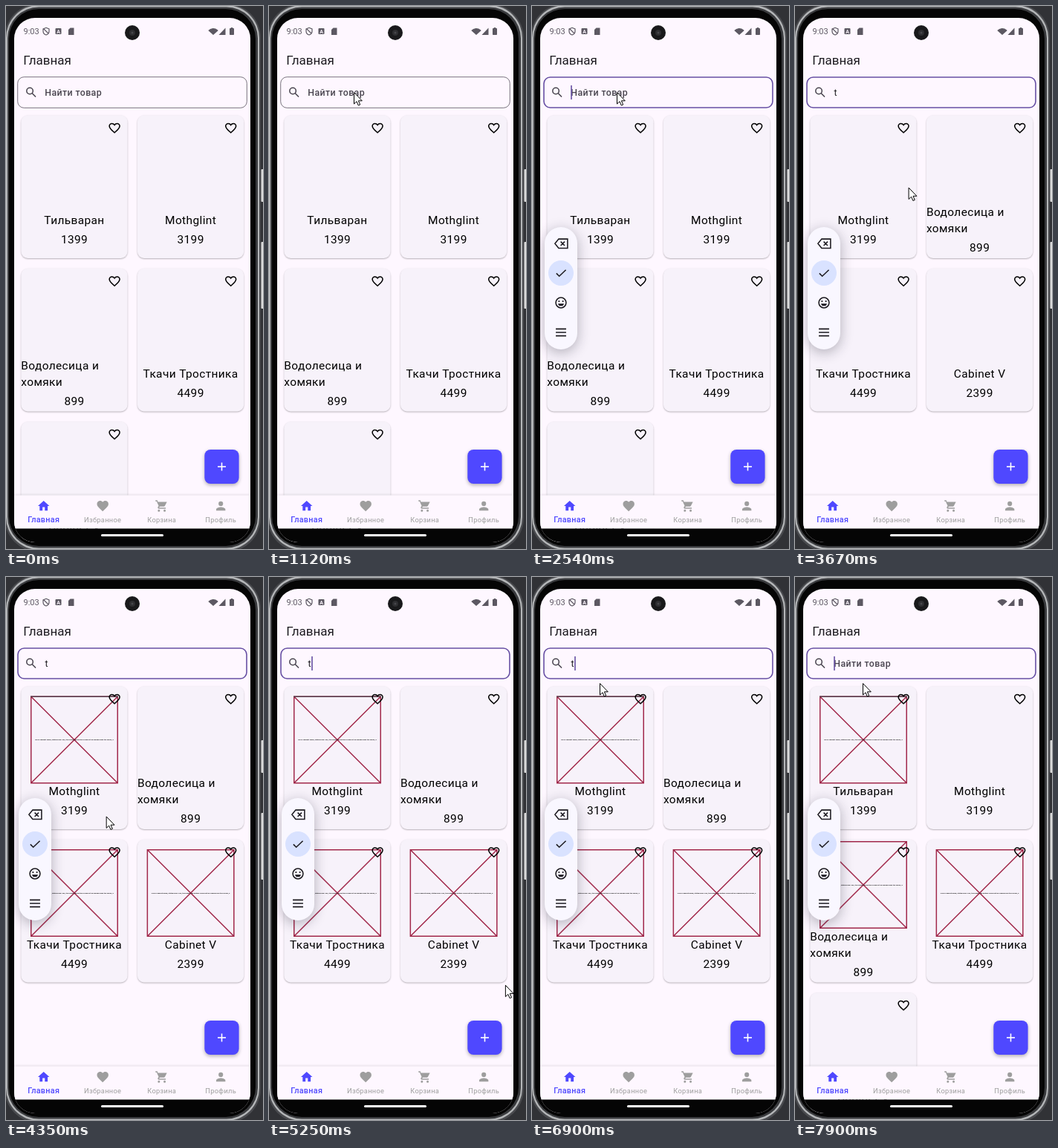
These frames come from a looping animation (346 px wide and 732 px high, 8000 ms). An HTML page with a canvas:

```html
<!DOCTYPE html>
<html lang="ru">
<head>
<meta charset="utf-8">
<title>Главная</title>
<style>
html, body { margin: 0; width: 100%; height: 100%; overflow: hidden; background: #313236; }
canvas { display: block; width: 346px; height: 732px; }
</style>
</head>
<body>
<canvas id="stage"></canvas>
<script>
const W = 346, H = 732, LOOP = 8000, DP = 0.772;
const INK = '#1d1b20', MUTED = '#49454f', PURPLE = '#6750a4', BLUE = '#4f48ff';
const GREY = '#9e9e9e', SURFACE = '#fef7ff', CARD = '#f7f2fa', RED = '#a1284a';

const canvas = document.getElementById('stage');
const ctx = canvas.getContext('2d');
const dpr = window.devicePixelRatio || 1;
canvas.width = W * dpr;
canvas.height = H * dpr;

const goods = [
  { name: ['Тильваран'], price: '1399' },
  { name: ['Mothglint'], price: '3199' },
  { name: ['Водолесица и', 'хомяки'], price: '899' },
  { name: ['Ткачи Тростника'], price: '4499' },
  { name: ['Cabinet V'], price: '2399' }
];
const BROKEN = [0, 2, 3];
const ERROR = 'HTTP request failed, statusCode: 403, the requested picture could not be loaded from the server, 0';

// Moments of the story, in ms
const T = { enter: 220, focus: 1260, bubble: 1920, slide: 2000, type: 2870, broken: 4280, clear: 7830 };
const BLINKS = [1470, 1960, 2540, 3340, 3850, 4350, 4860, 5370, 5870, 6380, 6900, 7430, 7830];

// Pointer: time, x, y
const TRACK = [
  [220, 296, 644], [480, 226, 440], [740, 156, 240], [980, 122, 145], [1120, 114, 116],
  [3340, 114, 116], [3560, 112, 210], [3860, 240, 284], [4060, 299, 262], [4210, 225, 300],
  [4350, 135, 322], [4600, 92, 470], [4850, 140, 568], [4980, 200, 560], [5200, 318, 540],
  [5450, 270, 605], [5800, 300, 560], [5950, 303, 525], [6080, 256, 497], [6350, 170, 330],
  [6620, 91, 145], [6700, 91, 143]
];

const HEART = new Path2D('M12 20C7 15.4 3 12.3 3 8.5C3 6 5 4 7.5 4C9.3 4 11 5 12 6.6C13 5 14.7 4 16.5 4C19 4 21 6 21 8.5C21 12.3 17 15.4 12 20z');
const HEART_FULL = new Path2D('M12 21.35C5.4 15.4 2 12.3 2 8.5C2 5.4 4.4 3 7.5 3C9.2 3 10.9 3.8 12 5.1C13.1 3.8 14.8 3 16.5 3C19.6 3 22 5.4 22 8.5C22 12.3 18.6 15.4 12 21.35z');
const HOME = new Path2D('M10 20v-6h4v6h5v-8h3L12 3 2 12h3v8z');
const CART = new Path2D('M1 2v2h2l3.6 7.6-1.35 2.45C4.5 15.4 5.5 17 7 17h12v-2H7.4l1-2h7.2c.75 0 1.4-.4 1.75-1L21 5H5.2L4.3 2zM5 20a2 2 0 1 0 4 0a2 2 0 1 0-4 0zM15 20a2 2 0 1 0 4 0a2 2 0 1 0-4 0z');
const PERSON = new Path2D('M8 8a4 4 0 1 0 8 0a4 4 0 1 0-8 0zM12 14c-2.7 0-8 1.3-8 4v2h16v-2c0-2.7-5.3-4-8-4z');
const SEARCH = new Path2D('M15 9.5a5.5 5.5 0 1 0-11 0a5.5 5.5 0 1 0 11 0zM13.7 13.7L19.8 19.8');
const ERASE = new Path2D('M8 4H23.5V20H8L1.5 12zM11.5 8.5l7 7M18.5 8.5l-7 7');
const CHECK = new Path2D('M4 12.5l5 5L20.5 6.5');
const SMILE = new Path2D('M3 12a9 9 0 1 0 18 0a9 9 0 1 0-18 0z');
const FACE = new Path2D('M7.2 9.5a1.4 1.4 0 1 0 2.8 0a1.4 1.4 0 1 0-2.8 0zM14 9.5a1.4 1.4 0 1 0 2.8 0a1.4 1.4 0 1 0-2.8 0zM7 13.5h10a5 4 0 0 1-10 0z');
const MENU = new Path2D('M3 6h18M3 12h18M3 18h18');
const ARROW = new Path2D('M.5 .5V16L4 12.7L6.3 18L8.7 17L6.4 11.8H11.3z');

const clamp = v => Math.min(1, Math.max(0, v));
const ease = v => 1 - Math.pow(1 - clamp(v), 3);

function box(x, y, w, h, r, fill) {
  ctx.beginPath();
  ctx.roundRect(x, y, w, h, r);
  if (fill) { ctx.fillStyle = fill; ctx.fill(); }
}

function disc(x, y, r, fill) {
  ctx.beginPath();
  ctx.arc(x, y, r, 0, Math.PI * 2);
  ctx.fillStyle = fill;
  ctx.fill();
}

function shadow(color, blur, dy) {
  ctx.shadowColor = color;
  ctx.shadowBlur = blur * dpr;
  ctx.shadowOffsetY = dy * dpr;
}

function noShadow() { shadow('transparent', 0, 0); }

function text(str, x, y, size, color, opt = {}) {
  ctx.font = `${opt.weight || 400} ${size}px Roboto, sans-serif`;
  ctx.letterSpacing = (opt.gap || 0) + 'px';
  ctx.textAlign = opt.align || 'left';
  ctx.fillStyle = color;
  ctx.fillText(str, x, y);
}

// Icons live on a 24-unit grid centred on x, y
function icon(path, x, y, color, line) {
  ctx.save();
  ctx.translate(x, y);
  ctx.scale(DP, DP);
  ctx.translate(-12, -12);
  if (line) {
    ctx.lineWidth = line;
    ctx.strokeStyle = color;
    ctx.stroke(path);
  } else {
    ctx.fillStyle = color;
    ctx.fill(path);
  }
  ctx.restore();
}

function poly(points, fill) {
  ctx.beginPath();
  points.forEach(([x, y]) => ctx.lineTo(x, y));
  ctx.closePath();
  ctx.fillStyle = fill;
  ctx.fill();
}

function drawPhone() {
  ctx.fillStyle = '#313236';
  ctx.fillRect(0, 0, W, H);
  box(343.5, 220, 4, 44, 1, '#dcdcdc');
  box(343.5, 318, 4, 90, 1, '#dcdcdc');
  box(-2, -3, 345, 739, 46, '#4a4b4f');
  box(0, -1, 341, 734, 44, '#b4b6b8');
  box(2, 1.5, 337, 729, 42, '#3a3b3e');
  box(4, 4, 332, 724, 40, '#050505');
}

function drawStatus() {
  const c = '#5c5862';
  text('9:03', 23.5, 38, 11, c);
  ctx.strokeStyle = c;
  ctx.lineWidth = 1.2;
  ctx.stroke(new Path2D('M54 29.3L58 31V34C58 36.5 56.3 38.3 54 39C51.700 38.3 50 36.500 50 34V31zM51 31L57 37'));
  box(66.500, 30, 8, 8, 1, c);
  text('A', 70.5, 36.6, 7, SURFACE, { align: 'center', weight: 700 });
  poly([[86.5, 29.5], [91.5, 29.5], [91.5, 39], [84, 39], [84, 32]], c);
  ctx.beginPath();
  ctx.moveTo(279, 39);
  ctx.arc(279, 39, 9, -Math.PI * 0.77, -Math.PI * 0.23);
  ctx.closePath();
  ctx.fillStyle = c;
  ctx.fill();
  poly([[286.5, 39], [295.5, 39], [295.5, 29.5]], c);
  box(301, 30, 6, 9, 0.8, c);
  box(302.7, 29, 2.6, 2, 0, c);
  disc(170, 36, 10, '#19191b');
  disc(170, 36, 4, '#2e2e31');
  disc(170, 36, 1.5, '#48484c');
}

function caretOn(t) {
  return BLINKS.filter(b => b <= t).length % 2 === 1;
}

function drawSearch(t) {
  const f = clamp((t - T.focus) / 170);
  const typed = t >= T.type && t < T.clear;
  const line = 1 + 0.6 * f;
  box(15.2 + line / 2, 95.2 + line / 2, 309.6 - line, 42.6 - line, 8.5);
  ctx.lineWidth = line;
  ctx.strokeStyle = f >= 1 ? PURPLE : `color-mix(in srgb, ${PURPLE} ${f * 100}%, #79747e)`;
  ctx.stroke();
  icon(SEARCH, 34, 116.5, MUTED, 2);
  if (typed) text('t', 52.5, 121, 12.35, INK, { gap: 0.386 });
  else text('Найти товар', 52.3, 120.8, 12.35, MUTED, { gap: 0.386, weight: 500 });
  if (caretOn(t)) {
    ctx.fillStyle = PURPLE;
    ctx.fillRect(typed ? 57.2 : 52.2, 107, 1.6, 19);
  }
}

function drawBroken(cx, y, top) {
  const s = 116.5, x = cx - s / 2;
  ctx.lineWidth = 1.5;
  ctx.strokeStyle = RED;
  ctx.beginPath();
  ctx.rect(x, y, s, s);
  ctx.moveTo(x, y);
  ctx.lineTo(x + s, y + s);
  ctx.moveTo(x + s, y);
  ctx.lineTo(x, y + s);
  ctx.stroke();
  if (top) {
    ctx.fillStyle = '#57404c';
    ctx.fillRect(x - 0.7, y - 0.8, s + 1.4, 1.5);
  }
  text(ERROR, cx, y + s / 2 + 0.8, 2.4, '#111', { align: 'center', weight: 700 });
}

function drawCard(item, i, broken) {
  const x = 20.3 + (i % 2) * 156.6, y = 147.3 + (i >> 1) * 206.5;
  const cx = x + 71.7, shift = (item.name.length - 1) * 11;
  const style = { gap: 0.386 }, mid = { gap: 0.386, align: 'center' };
  shadow('rgba(0,0,0,.28)', 2, 1);
  box(x, y, 143.3, 192.7, 9, CARD);
  noShadow();
  if (broken) drawBroken(cx, y + 14 - shift, i === 0);
  item.name.forEach((row, n) => {
    const base = y + 146.7 - shift + n * 22;
    if (shift) text(row, x, base, 15.44, '#000', style);
    else text(row, cx, base, 15.44, '#000', mid);
  });
  text(item.price, cx, y + 172.7 + shift, 15.44, '#000', mid);
  icon(HEART, x + 125.8, y + 17.3, '#000', 2);
}

function drawList(t) {
  const found = t >= T.type && t < T.clear ? goods.slice(1) : goods;
  found.forEach((item, i) => drawCard(item, i, t >= T.broken && BROKEN.includes(i)));
}

function drawFab() {
  shadow('rgba(0,0,0,.3)', 5, 2);
  box(267.3, 598, 46.3, 46, 8, BLUE);
  noShadow();
  ctx.fillStyle = '#fff';
  ctx.fillRect(285, 620.2, 11, 1.6);
  ctx.fillRect(289.7, 615.5, 1.6, 11);
}

function drawNav() {
  shadow('rgba(0,0,0,.22)', 4, 0);
  ctx.fillStyle = SURFACE;
  ctx.fillRect(11, 659.5, 318, 45);
  noShadow();
  [[HOME, 'Главная'], [HEART_FULL, 'Избранное'], [CART, 'Корзина'], [PERSON, 'Профиль']].forEach(([path, label], i) => {
    const x = 50.7 + i * 79.5, color = i ? GREY : BLUE;
    icon(path, x, 674, color);
    text(label, x, 695.5, i ? 9.27 : 10.8, color, { align: 'center', gap: 0.3, weight: i ? 400 : 500 });
  });
  ctx.fillStyle = '#050505';
  ctx.fillRect(11, 704.5, 318, 20);
  box(128, 712, 84, 3, 1.5, '#fff');
}

function drawBubble(t) {
  if (t < T.bubble) return;
  const d = 8 * (1 - ease((t - T.slide) / 270));
  ctx.save();
  ctx.globalAlpha = clamp(0.4 + (t - T.bubble) / 100);
  ctx.translate(39 + d, 298 + d);
  shadow('rgba(30,30,50,.32)', 17, 4);
  box(-22, 0, 44, 165, 22, '#f9f7ff');
  noShadow();
  disc(0, 62, 17, '#d9e2ff');
  icon(ERASE, 0, 22.3, INK, 2);
  icon(CHECK, 0, 62, INK, 2);
  icon(SMILE, 0, 102, INK, 2);
  icon(FACE, 0, 102, INK);
  icon(MENU, 0, 142, INK, 2.2);
  ctx.restore();
}

// Cubic Hermite between the two neighbouring track points
function pointerAt(t) {
  const last = TRACK.length - 1;
  if (t >= TRACK[last][0]) return TRACK[last].slice(1);
  const k = TRACK.findIndex(p => p[0] > t) - 1;
  const a = TRACK[k], b = TRACK[k + 1], span = b[0] - a[0], u = (t - a[0]) / span;
  const slope = (n, axis) => {
    const p = TRACK[n - 1], q = TRACK[n + 1], c = TRACK[n];
    if (!p || !q || q[0] - c[0] > 1000 || c[0] - p[0] > 1000) return 0;
    return (q[axis] - p[axis]) / (q[0] - p[0]) * span;
  };
  return [1, 2].map(axis => {
    const u2 = u * u, u3 = u2 * u;
    return (2 * u3 - 3 * u2 + 1) * a[axis] + (u3 - 2 * u2 + u) * slope(k, axis) +
      (3 * u2 - 2 * u3) * b[axis] + (u3 - u2) * slope(k + 1, axis);
  });
}

function drawPointer(t) {
  if (t < T.enter) return;
  const [x, y] = pointerAt(t);
  ctx.save();
  ctx.translate(x, y);
  ctx.fillStyle = '#fff';
  ctx.fill(ARROW);
  ctx.lineWidth = 1;
  ctx.strokeStyle = '#000';
  ctx.stroke(ARROW);
  ctx.restore();
}

function draw(t) {
  ctx.setTransform(dpr, 0, 0, dpr, 0, 0);
  drawPhone();
  ctx.save();
  box(11, 16, 318, 707, 28, SURFACE);
  ctx.clip();
  drawStatus();
  text('Главная', 23.3, 79, 17, INK);
  drawSearch(t);
  drawList(t);
  drawFab();
  drawNav();
  drawBubble(t);
  ctx.restore();
  drawPointer(t);
}

const start = performance.now();
function tick() {
  draw((performance.now() - start) % LOOP);
  requestAnimationFrame(tick);
}
tick();
</script>
</body>
</html>
```
